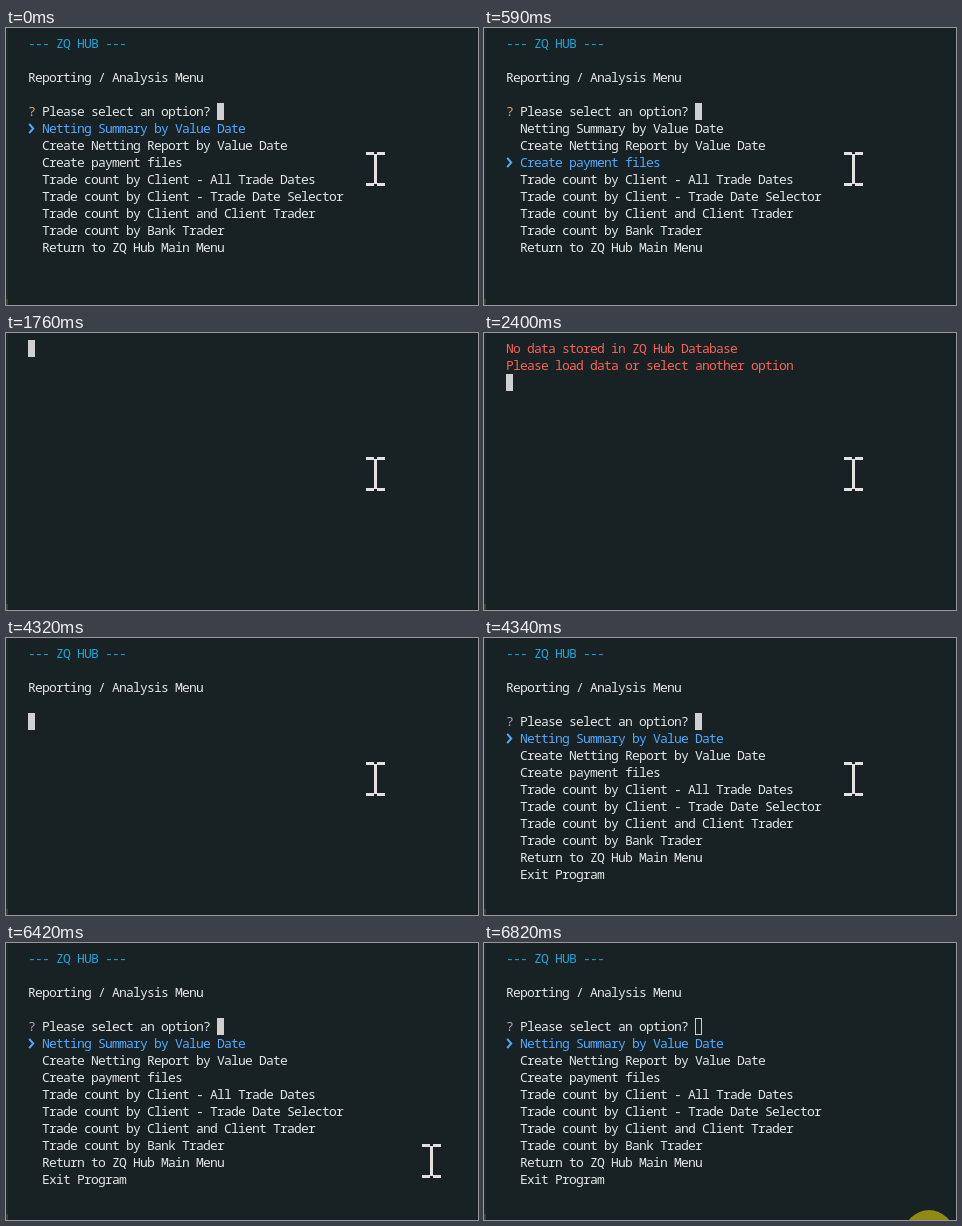
Write an HTML page that moves like this. It is 472x277 px and loops after 6880 ms.

```html
<!DOCTYPE html>
<html lang="en">
<head>
<meta charset="utf-8">
<title>Terminal menu</title>
<style>
  html, body { margin: 0; width: 100%; height: 100%; overflow: hidden; background: #182123; }
  svg { display: block; width: 472px; height: 277px; }
  text {
    font: 500 13px "Noto Sans Mono", "DejaVu Sans Mono", monospace;
    letter-spacing: calc(7px - 1ch);
    white-space: pre;
  }
</style>
</head>
<body>
<svg id="stage" viewBox="0 0 472 277">
  <rect width="472" height="277" fill="#182123"/>
  <rect width="2" height="271" fill="#202a2b"/>
  <rect y="271" width="2" height="6" fill="#3a4429"/>
  <g id="screen"></g>
  <path id="pointer" fill="none" stroke="#4fabff" stroke-width="2" d="M23.2 95.8l4 4.7l-4 4.7"/>
  <rect id="caret"/>
  <circle id="click" cx="445" cy="292" r="25" fill="#8f8a12"/>
  <path id="beam" fill="#e6dfdf" d="M-10 -17h8v3h-8zM1 -17h8v3h-8zM-2 -15h3v30h-3zM-10 14h8v3h-8zM1 14h8v3h-8z"/>
</svg>
<script>
const LOOP = 6880, COL = 7, ROW = 17, LEFT = 22, TOP = 7, FIRST = 5;
const WHITE = '#e5e5e5', CYAN = '#1ba6d8', BLUE = '#4fabff', RED = '#f8625c';
const OPTIONS = [
  'Netting Summary by Value Date',
  'Create Netting Report by Value Date',
  'Create payment files',
  'Trade count by Client - All Trade Dates',
  'Trade count by Client - Trade Date Selector',
  'Trade count by Client and Client Trader',
  'Trade count by Bank Trader',
  'Return to ZQ Hub Main Menu',
  'Exit Program'
];
const KEY_TIMES = [360, 590, 780, 930, 1090];
const $ = id => document.getElementById(id);
const set = (el, attrs) => { for (const k in attrs) el.setAttribute(k, attrs[k]); };
const show = (el, on) => set(el, { visibility: on ? 'visible' : 'hidden' });

function group() {
  const g = document.createElementNS('http://www.w3.org/2000/svg', 'g');
  $('screen').append(g);
  return g;
}

function line(parent, row, col, str, fill) {
  const el = document.createElementNS('http://www.w3.org/2000/svg', 'text');
  set(el, { x: LEFT + col * COL, y: TOP + row * ROW + 13, fill });
  el.textContent = str;
  parent.append(el);
  return el;
}

const header = group(), menu = group(), error = group();
line(header, 0, 0, '--- ZQ HUB ---', CYAN);
line(header, 2, 0, 'Reporting / Analysis Menu', WHITE);
const mark = line(menu, 4, 0, '?', WHITE);
line(menu, 4, 2, 'Please select an option?', WHITE);
const items = OPTIONS.map((str, i) => line(menu, FIRST + i, 2, str, WHITE));
line(error, 0, 0, 'No data stored in ZQ Hub Database', RED);
line(error, 1, 0, 'Please load data or select another option', RED);

function drawCaret(row, col, hollow) {
  const x = LEFT + col * COL, y = TOP + row * ROW;
  set($('caret'), hollow
    ? { x: x + .5, y: y + .5, width: COL - 1, height: ROW - 1, fill: 'none', stroke: '#d0d0d0' }
    : { x, y, width: COL, height: ROW, fill: '#d0d0d0', stroke: 'none' });
}

// The mouse leaves downwards in 20 ms steps.
function drawBeam(t) {
  const step = Math.max(0, Math.min(9, Math.floor((t - 6320) / 20) + 1));
  const p = step / 9;
  const x = Math.round(370 + 90 * p ** 1.16);
  const y = Math.round(141 + 160 * p ** 1.8);
  set($('beam'), { transform: `translate(${x} ${y})` });
  show($('beam'), step < 9);
}

function draw(t) {
  const early = t < 1760, late = t >= 4340;
  const hasMenu = early || late;
  const hasError = t >= 2400 && t < 4320;
  const selected = early ? KEY_TIMES.filter(k => t >= k).length : 0;

  show(header, early || t >= 4320);
  show(menu, hasMenu);
  show(error, hasError);
  show($('pointer'), hasMenu);
  set($('pointer'), { transform: `translate(0 ${selected * ROW})` });
  set(mark, { fill: late ? '#c49ad0' : '#deab66' });
  items.forEach((el, i) => set(el, { fill: i === selected ? BLUE : WHITE }));
  items[8].style.display = late ? '' : 'none';

  if (hasMenu) drawCaret(4, 27, t >= 6820);
  else drawCaret(t < 2400 ? 0 : hasError ? 2 : 4, 0, false);

  drawBeam(t);
  show($('click'), t >= 6800);
}

const start = performance.now();
function tick() {
  draw((performance.now() - start) % LOOP);
  requestAnimationFrame(tick);
}
draw(0);
requestAnimationFrame(tick);
</script>
</body>
</html>
```
